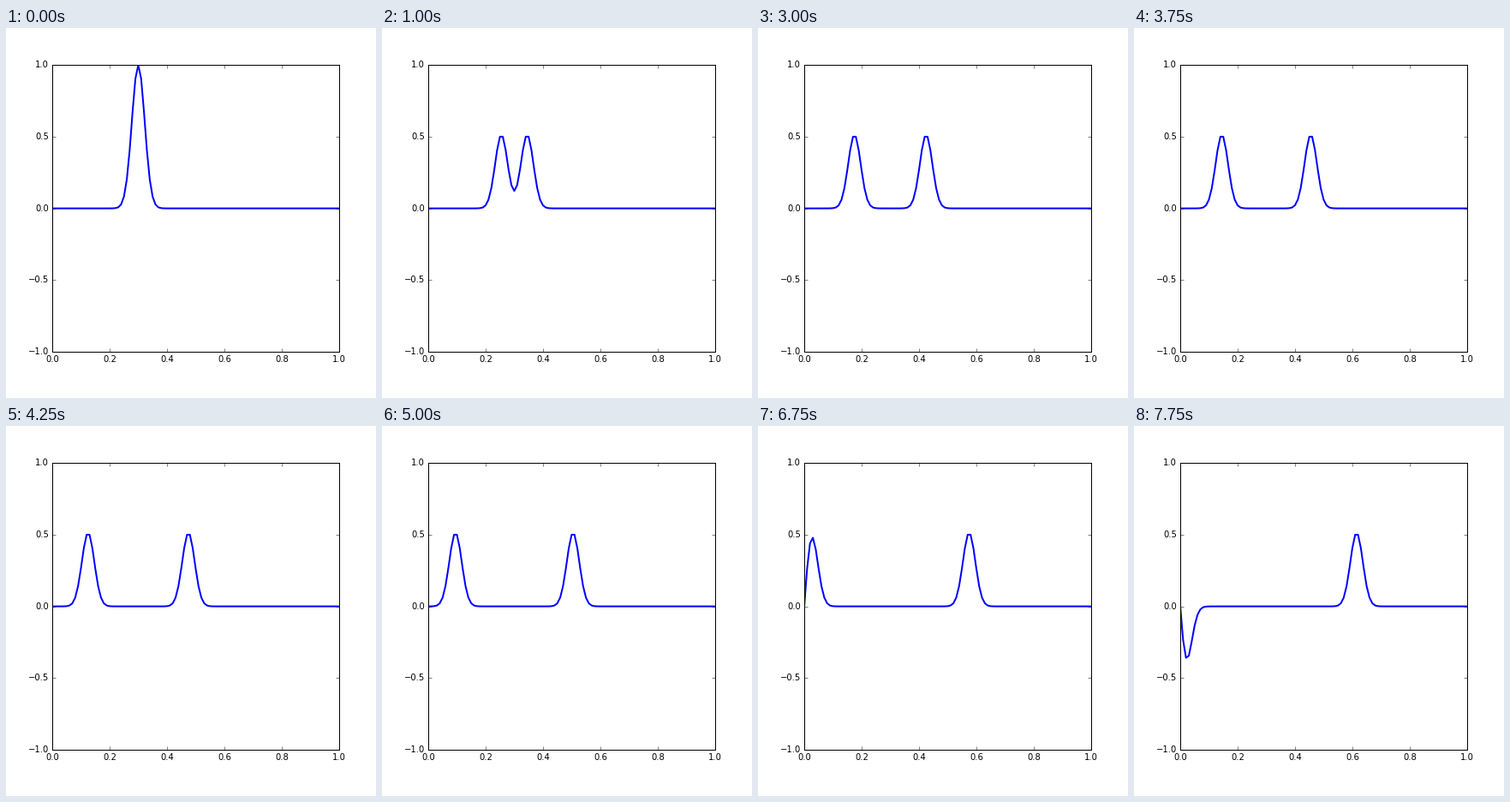
Recreate the animation shown at these times as a matplotlib script. Size 432 px wide and 432 px high, loop 8 s.

```python
import numpy as np
import matplotlib.pyplot as plt
from matplotlib.animation import FuncAnimation

FRAMES, INTERVAL = 32, 250
POINTS = 101

plt.style.use("classic")
plt.rcParams.update({
    "font.family": "DejaVu Sans",
    "font.size": 10,
    "xtick.labelsize": 10,
    "ytick.labelsize": 10,
    "figure.facecolor": "white",
    "savefig.facecolor": "white",
    "savefig.dpi": "figure",
})


def simulate(start, steps):
    """Leapfrog wave equation at Courant number 1 with fixed ends."""
    prev, cur = start, start
    states = [cur]
    for _ in range(steps - 1):
        nxt = np.zeros_like(cur)
        nxt[1:-1] = cur[2:] + cur[:-2] - prev[1:-1]
        prev, cur = cur, nxt
        states.append(cur)
    return states


x = np.linspace(0, 1, POINTS)
waves = simulate(np.exp(-1000 * (x - 0.3) ** 2), FRAMES)

fig = plt.figure(figsize=(6, 6), dpi=72)
fig.subplots_adjust(left=0.125, right=0.9, bottom=0.125, top=0.9)
ax = fig.add_subplot(111)
ax.set_xlim(0, 1)
ax.set_ylim(-1, 1)
ax.set_xticks(np.linspace(0, 1, 6))
ax.set_yticks(np.linspace(-1, 1, 5))
line, = ax.plot(x, waves[0], color="blue", lw=2)


def draw(i):
    line.set_ydata(waves[i])
    return line,


anim = FuncAnimation(fig, draw, frames=FRAMES, interval=INTERVAL,
                     repeat=True, repeat_delay=0, blit=False)
plt.show()
```
